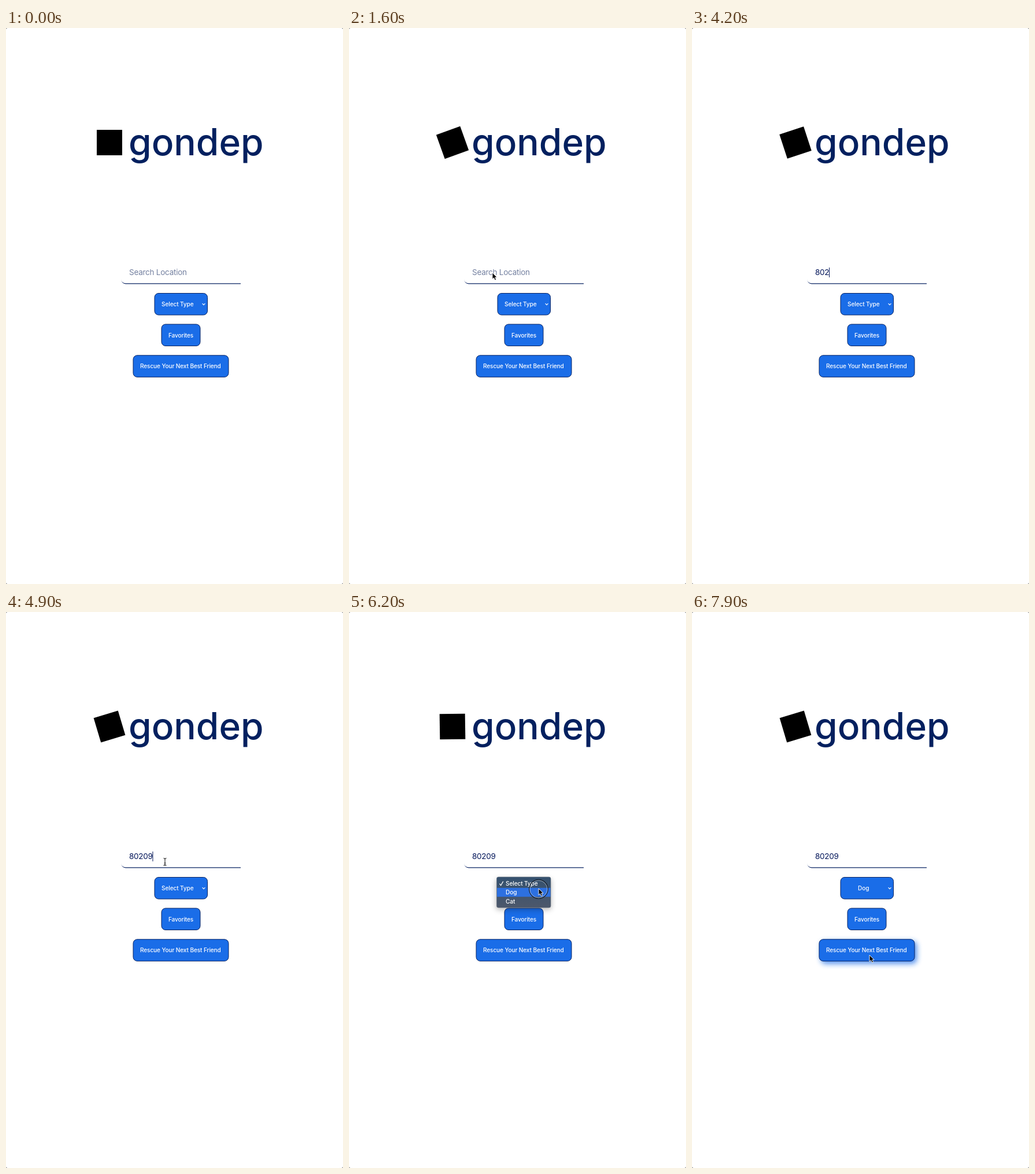
These frames come from a looping animation (583x961 px, 8000 ms). An HTML page:

```html
<!DOCTYPE html>
<html lang="en">
<head>
<meta charset="utf-8">
<title>Pet search</title>
<style>
html, body { margin: 0; width: 100%; height: 100%; overflow: hidden; background: #777; }
svg { display: block; width: 583px; height: 961px; font-family: Inter, sans-serif; }
.logo { font-size: 64px; font-weight: 500; fill: #03205f; }
.field { font-size: 13.5px; letter-spacing: -.25px; }
.label { font-size: 10.1px; font-weight: 500; letter-spacing: -.12px; fill: #fff; }
.button { fill: #1a6de8; stroke: #0a2463; }
</style>
</head>
<body>
<svg viewBox="0 0 583 961">
  <defs>
    <filter id="blur" x="-30%" y="-70%" width="160%" height="240%"><feGaussianBlur stdDeviation="5"/></filter>
    <linearGradient id="panel" x2="0" y2="1">
      <stop stop-color="#34516f"/><stop offset="1" stop-color="#4d586b"/>
    </linearGradient>
  </defs>
  <rect width="583" height="961" rx="3" fill="#fff"/>

  <rect id="mark" x="157" y="176" width="44" height="44"/>
  <text class="logo" x="212" y="219.5">gondep</text>

  <text id="hint" class="field" x="213" y="427" fill="#7480a0">Search Location</text>
  <text id="value" class="field" x="213" y="427" fill="#03165a"></text>
  <rect id="caret" y="414" width="1" height="17" fill="#03165a"/>
  <path d="M199 434A8 8.5 0 0 0 207 442.5H406V441.3H207A8 7.3 0 0 1 199 434Z" fill="#0a2463"/>

  <rect class="button" x="257" y="458.5" width="91.5" height="37.5" rx="7"/>
  <text id="choice" class="label" y="481"></text>
  <path d="M339.6 476.2l2.4 2.4 2.4-2.4" fill="none" stroke="#fff" stroke-width="1.2"/>

  <rect class="button" x="269" y="512" width="67" height="37.5" rx="7"/>
  <text class="label" x="281" y="534.6">Favorites</text>

  <rect id="glow" x="223" y="569" width="166" height="39" rx="8" fill="#1a6de8" filter="url(#blur)"/>
  <rect class="button" x="220" y="565.8" width="165" height="37.5" rx="7"/>
  <text class="label" x="232" y="588.3">Rescue Your Next Best Friend</text>

  <g id="menu">
    <rect x="254" y="461" width="96" height="54" rx="5" fill="#000" opacity=".25" filter="url(#blur)"/>
    <rect x="255.5" y="458" width="93.5" height="53" rx="3" fill="url(#panel)" stroke="#6b7482" stroke-width=".6"/>
    <rect id="row" x="256" width="92.5" height="15.4" fill="#2d70e0"/>
    <path d="M260.5 469.6l2.2 3 4-7" fill="none" stroke="#fff" stroke-width="1.2"/>
    <text class="label" x="271" y="472.8">Select Type</text>
    <text class="label" x="271" y="488.2">Dog</text>
    <text class="label" x="271" y="503.6">Cat</text>
    <rect x="269" y="512" width="67" height="8" rx="4" fill="none"/>
  </g>

  <g id="pointer">
    <g id="ring" fill="none">
      <circle cy="1" r="16.3" stroke="#18222f" stroke-width="1.2"/>
      <circle cy="1" r="15" stroke="#fff" stroke-opacity=".45"/>
    </g>
    <path id="arrow" d="M0 0V11.2L2.6 8.8L4.5 13L6.6 12.1L4.8 8H8.2Z" fill="#000" stroke="#fff" stroke-width=".9"/>
    <path id="beam" d="M-2.5 -6.5Q0 -6.5 0 -4.5V4Q0 6 -2.5 6M2.5 -6.5Q0 -6.5 0 -4.5M2.5 6Q0 6 0 4M-1.5 2H1.5" fill="none" stroke="#222" stroke-width="1.1"/>
  </g>
</svg>
<script>
const LOOP = 8000, STEP = 100;
const el = Object.fromEntries([...document.querySelectorAll('[id]')].map(n => [n.id, n]));

// time, x, y
const path = [
  [100, 408, 874], [500, 385, 660], [1000, 300, 480], [1600, 248, 423],
  [2000, 275, 432], [4900, 275, 432], [5600, 343, 465], [5800, 341, 469],
  [6100, 328, 478], [6700, 328, 478], [7500, 307, 593], [8000, 307, 593]
];
const keys = [3500, 3800, 4100, 4300, 4500];
const clicks = [2700, 5800, 6200];
const FOCUS = 2700, OPEN = 5900, CLOSE = 6500;

const within = (t, a, b) => t >= a && t < b;
const clamp = v => Math.min(1, Math.max(0, v));
const show = (node, on) => node.setAttribute('visibility', on ? 'inherit' : 'hidden');

function pointerAt(t) {
  const i = Math.max(1, path.findIndex(p => p[0] >= t));
  const [t0, x0, y0] = path[i - 1], [t1, x1, y1] = path[i];
  const u = clamp((t - t0) / (t1 - t0)), k = u * u * (3 - 2 * u);
  return [x0 + (x1 - x0) * k, y0 + (y1 - y0) * k];
}

function drawLogo(t) {
  const held = within(t, 2000, 2400) ? 2000 : t;
  const angle = -10 * (1 - Math.cos(held / 3000 * 2 * Math.PI));
  el.mark.setAttribute('transform', `rotate(${angle} 179 198)`);
}

function drawField(t) {
  const typed = keys.filter(k => k <= t);
  el.value.textContent = '80209'.slice(0, typed.length);
  show(el.hint, !typed.length);
  const last = typed.length ? typed[typed.length - 1] : FOCUS;
  show(el.caret, within(t, FOCUS, OPEN) && (t - last) % 1000 < 500);
  el.caret.setAttribute('x', 212.7 + (typed.length ? el.value.getComputedTextLength() : 0));
}

function drawSelect(t, y) {
  const picked = t >= CLOSE;
  el.choice.textContent = picked ? 'Dog' : 'Select Type';
  el.choice.setAttribute('x', picked ? 287 : 269);
  show(el.menu, within(t, OPEN, CLOSE));
  el.row.setAttribute('y', y < 476.5 ? 461.4 : 476.8);
}

function drawPointer(t, x, y) {
  const beam = within(t, 1700, 5200);
  el.pointer.setAttribute('transform', `translate(${x} ${y})`);
  show(el.pointer, t >= 100 && !within(t, 3500, 4900));
  show(el.beam, beam);
  show(el.arrow, !beam);
  show(el.ring, clicks.some(c => within(t, c, c + 200)));
}

function draw() {
  const t = Math.floor(performance.now() % LOOP / STEP) * STEP;
  const [x, y] = pointerAt(t);
  drawLogo(t);
  drawField(t);
  drawSelect(t, y);
  drawPointer(t, x, y);
  el.glow.setAttribute('opacity', .75 * clamp((t - 7200) / 300));
  requestAnimationFrame(draw);
}
draw();
</script>
</body>
</html>
```
